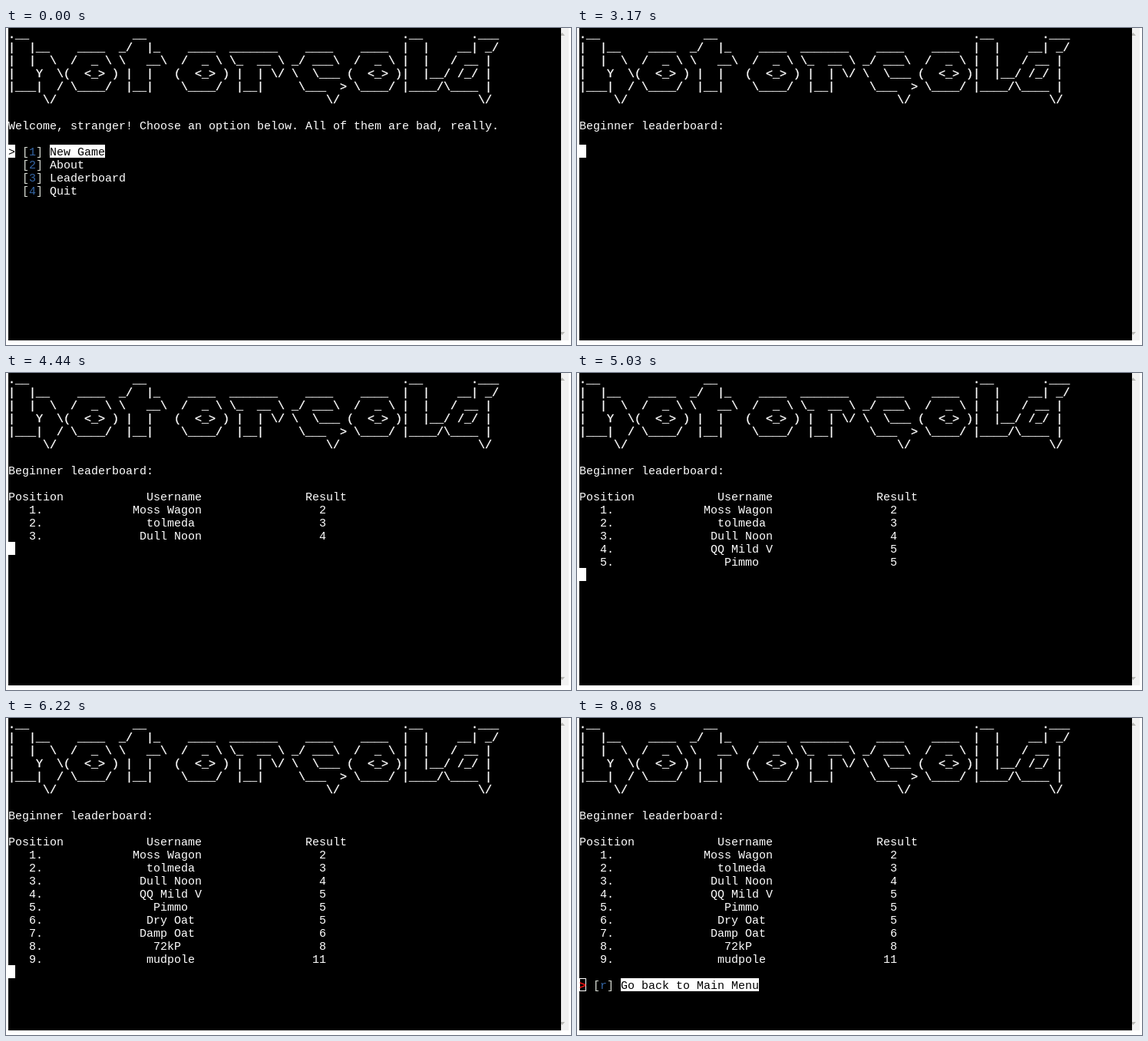
These frames come from a looping animation (736x413 px, 8.28 s). An HTML page:

```html
<!DOCTYPE html>
<html lang="en">
<head>
<meta charset="utf-8">
<title>Terminal leaderboard</title>
<style>
  html, body { margin: 0; width: 100%; height: 100%; overflow: hidden; background: #fff; }
  svg { display: block; }
  text { font-family: "Liberation Mono", monospace; font-size: 15px; white-space: pre; }
  #banner { stroke: #fff; stroke-width: .35px; }
</style>
</head>
<body>
<svg width="736" height="413" viewBox="0 0 736 413">
  <path d="M723 0h10v407h-10z" fill="#f1f1f1"/>
  <path d="M721 10h7l-3.5 -4zM721 396h7l-3.5 4z" fill="#b8b8b4"/>
  <path d="M3 0h720v407H3z"/>
  <g id="banner"></g>
  <g id="screen"></g>
</svg>
<script>
const LOOP = 8280, CELL = 9, LINE = 17, BASELINE = 14, LEFT = 3, TOP = -1;
const WHITE = '#fff', BLACK = '#000', GRAY = '#d3d7cf', BLUE = '#3465a4', RED = '#e11';
const STEPS = [0, 1120, 3170, 3830, 4110, 4440, 4700, 5030, 5300, 5630, 5890, 6220, 6490, 8080];

const BANNER = [
  '.__' + ' '.repeat(15) + '__' + ' '.repeat(37) + '.__' + ' '.repeat(7) + '.___',
  String.raw`|  |__    ____  _/  |_    ____  _______    ____    ____  |  |    __| _/`,
  String.raw`|  |  \  /  _ \ \   __\  /  _ \ \_  __ \ _/ ___\  /  _ \ |  |   / __ |`,
  String.raw`|   Y  \(  <_> ) |  |   (  <_> ) |  | \/ \  \___ (  <_> )|  |__/ /_/ |`,
  String.raw`|___|  / \____/  |__|    \____/  |__|     \___  > \____/ |____/\____ |`,
  ['     ', ' '.repeat(39), ' '.repeat(20), ''].join('\\/')
];

const MENUS = [
  ['Welcome, stranger! Choose an option below. All of them are bad, really.',
    'New Game', 'About', 'Leaderboard', 'Quit'],
  ['Choose which leaderboard you wish to take a sneak peak into.',
    'Beginner', 'Intermediate', 'Expert', 'Go back']
];

const SCORES = [
  ['Moss Wagon', 2], ['tolmeda', 3], ['Dull Noon', 4], ['QQ Mild V', 5], ['Pimmo', 5],
  ['Dry Oat', 5], ['Damp Oat', 6], ['72kP', 8], ['mudpole', 11]
];

const escapeText = s => s.replace(/&/g, '&amp;').replace(/</g, '&lt;');
const x = col => LEFT + col * CELL;
const y = row => TOP + row * LINE;

const print = (row, col, str, color = WHITE, weight = 'normal') =>
  `<text x="${x(col)}" y="${y(row) + BASELINE}" fill="${color}" font-weight="${weight}">${escapeText(String(str))}</text>`;

const block = (row, col, length = 1) =>
  `<rect x="${x(col)}" y="${y(row)}" width="${length * CELL}" height="${LINE}" fill="${WHITE}"/>`;

const hollowBlock = (row, col) =>
  `<rect x="${x(col) + .5}" y="${y(row) + .5}" width="${CELL - 1}" height="${LINE - 1}" fill="none" stroke="${WHITE}"/>`;

const centered = (row, middle, value) =>
  print(row, middle - Math.floor(String(value).length / 2), value);

function option(row, key, label, selected, focused = true) {
  let out = print(row, 2, '[', GRAY) + print(row, 3, key, BLUE) + print(row, 4, ']', GRAY);
  if (selected) {
    out += focused
      ? block(row, 0) + print(row, 0, '>', BLACK)
      : hollowBlock(row, 0) + print(row, 0, '>', RED, 'bold');
    out += block(row, 6, label.length);
  }
  return out + print(row, 6, label, selected ? BLACK : WHITE);
}

function menu([heading, ...labels]) {
  return print(7, 0, heading) +
    labels.map((label, i) => option(9 + i, i + 1, label, i === 0)).join('');
}

function leaderboard(step) {
  const shown = Math.min(step - 2, SCORES.length);
  let out = print(7, 0, 'Beginner leaderboard:');
  if (shown) out += print(9, 0, 'Position') + print(9, 20, 'Username') + print(9, 43, 'Result');
  SCORES.slice(0, shown).forEach(([name, result], i) => {
    const row = 10 + i;
    out += print(row, 3, `${i + 1}.`) + centered(row, 23, name) + centered(row, 45, result);
  });
  if (step >= 12) return out + option(20, 'r', 'Go back to Main Menu', true, step === 12);
  return out + block(shown ? 10 + shown : 9, 0);
}

const screenGroup = document.getElementById('screen');
document.getElementById('banner').innerHTML = BANNER.map((line, row) => print(row, 0, line)).join('');

let current = -1;
function draw() {
  const time = performance.now() % LOOP;
  const step = STEPS.filter(start => start <= time).length - 1;
  if (step !== current) {
    current = step;
    screenGroup.innerHTML = step < 2 ? menu(MENUS[step]) : leaderboard(step);
  }
  requestAnimationFrame(draw);
}
draw();
</script>
</body>
</html>
```
